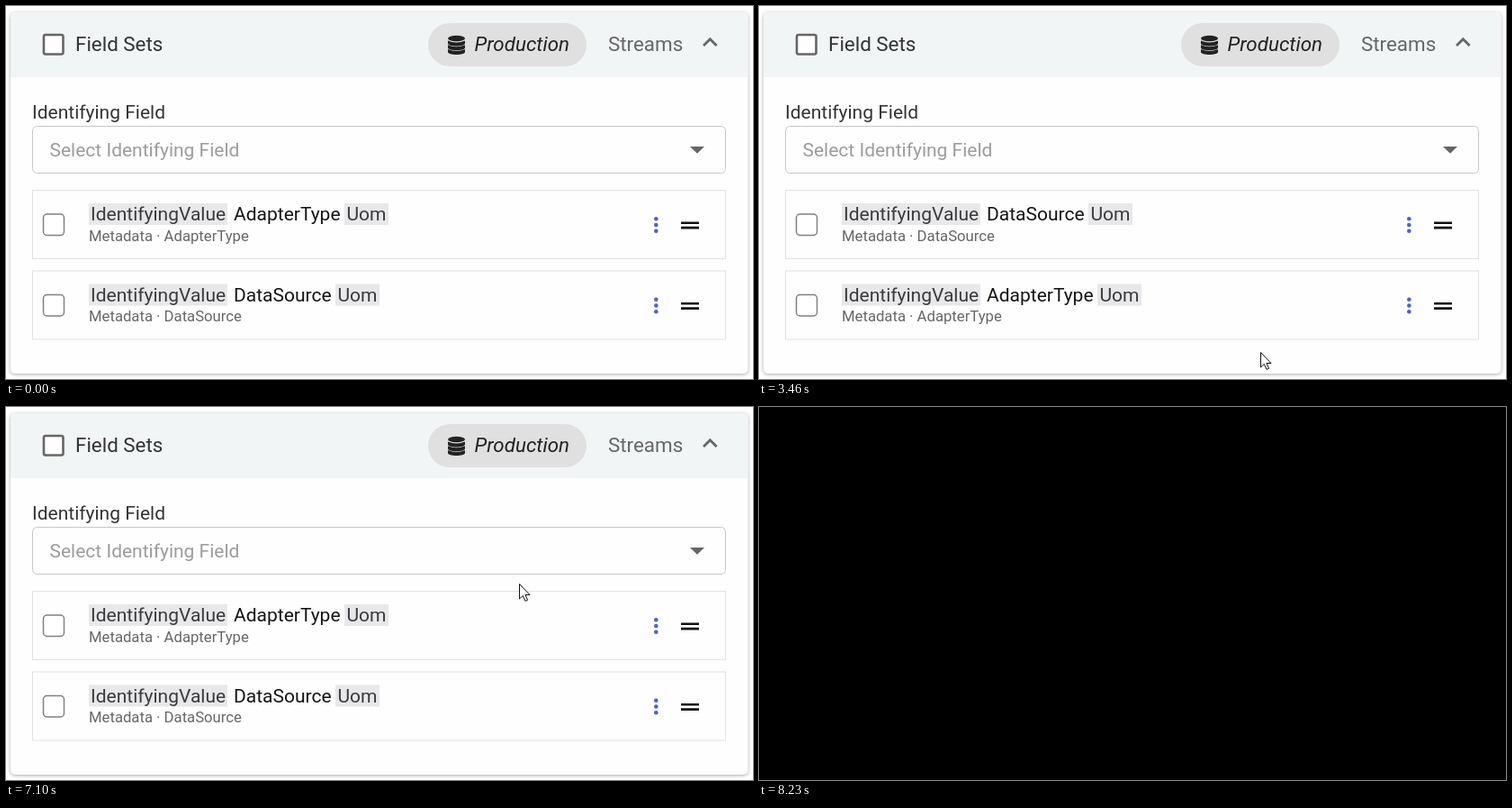
These frames come from a looping animation (830x414 px, 8730 ms). An HTML page:

```html
<!DOCTYPE html>
<html lang="en">
<head>
<meta charset="utf-8">
<title>Reordering field sets</title>
<style>
  html, body { margin: 0; width: 100%; height: 100%; overflow: hidden; background: #fff; }
  svg { display: block; width: 830px; height: 414px; font: 21px Roboto, Arial, sans-serif; }
  .card { fill: #fefefe; filter: drop-shadow(0 1.5px 2px #0005); }
  .big { font-size: 22.4px; }
  .meta { font-size: 16.7px; fill: #666; }
  .frame { fill: #fefefe; stroke: #e2e2e2; }
  .hot .frame { fill: #f1f1fc; stroke: #dcdcee; }
  .chip { fill: #e8e8ea; }
  .tag { fill: #3a3a3e; }
  .name { fill: #141414; }
  .hot .name { fill: #3a3a3e; }
  .check { fill: #fff; stroke: #808080; stroke-width: 1.5; }
</style>
</head>
<body>
<svg viewBox="0 0 830 414">
  <defs>
    <radialGradient id="glow" gradientUnits="userSpaceOnUse" cx="0" cy="0" r="1" gradientTransform="translate(0 -6) scale(500 37)">
      <stop offset="0" stop-color="#fff" stop-opacity=".88"/>
      <stop offset="1" stop-color="#fff" stop-opacity="0"/>
    </radialGradient>
    <mask id="fade" maskUnits="userSpaceOnUse" x="-600" y="-60" width="1200" height="120">
      <rect x="-600" y="-60" width="1200" height="120" fill="url(#glow)"/>
    </mask>
  </defs>

  <rect class="card" x="5" y="7" width="819.5" height="401" rx="5"/>
  <path d="M5 79V12q0-5 5-5H819.500q5 0 5 5V79z" fill="#f2f5f5"/>
  <rect x="42" y="32" width="21.500" height="21.500" rx="2" fill="#fff" stroke="#666" stroke-width="2.600"/>
  <text class="big" x="77" y="50" fill="#333">Field Sets</text>
  <rect x="469" y="19" width="176" height="48" rx="24" fill="#e0e0e1"/>
  <g fill="#222">
    <ellipse cx="500.500" cy="36" rx="9.500" ry="3.200"/>
    <path id="disc" d="M491 38.500q9.500 4 19 0v3c0 4-19 4-19 0z"/>
    <use href="#disc" y="4.700"/>
    <use href="#disc" y="9.400"/>
  </g>
  <text class="big" x="520.500" y="50" fill="#222" font-style="italic">Production</text>
  <text class="big" x="669" y="50" fill="#666">Streams</text>
  <path d="M775 44l7.300-7.300 7.300 7.300" fill="none" stroke="#666" stroke-width="2.800"/>

  <text x="29" y="125" fill="#333">Identifying Field</text>
  <rect x="29.500" y="133.500" width="770" height="52" rx="5" fill="#fefefe" stroke="#c6c6c6"/>
  <text x="48.500" y="167" fill="#9c9c9c">Select Identifying Field</text>
  <path d="M760 156h16l-8 7.800z" fill="#666"/>

  <g id="rows"></g>
  <rect id="line" x="29" y="196" width="771" height="4" fill="#4b5ce0"/>
  <g id="ghost" mask="url(#fade)"><use id="copy"/></g>
  <g id="cursor">
    <path d="M.5-.5V16l3.800-3.600 2.700 6 2.600-1.100-2.700-5.800H12z" fill="#fff" stroke="#111"/>
    <g id="badge" fill="none" stroke="#111">
      <rect x="3.500" y="14.500" width="10" height="7" stroke-dasharray="1.500 1.500"/>
      <rect x="10.500" y="18.500" width="10" height="10" fill="#fff"/>
      <path d="M12.500 23.500h6m-3-3v6"/>
    </g>
  </g>
  <rect id="dark" width="830" height="414"/>
</svg>
<script>
const $ = id => document.getElementById(id);
const LOOP = 8730, ROW_STEP = 89.5;

const row = (name, uomX) => `<g id="${name}">
  <rect class="frame" x="29.5" y="204.5" width="770" height="76"/>
  <rect class="check" x="41.5" y="231" width="23" height="23.5" rx="4"/>
  <rect class="chip" x="92" y="219" width="154" height="24"/>
  <rect class="chip" x="${uomX}" y="219" width="49" height="24"/>
  <text class="tag" x="94" y="238">IdentifyingValue</text>
  <text class="name" x="253" y="238">${name}</text>
  <text class="tag" x="${uomX + 2.5}" y="238">Uom</text>
  <text class="meta" x="92" y="260.500">Metadata · ${name}</text>
  ${[236.3, 243, 249.7].map(y => `<circle cx="722.300" cy="${y}" r="2.300" fill="#4f5ce0"/>`).join('')}
  <path d="M750 240.700h20m-20 5.400h20" stroke="#111" stroke-width="2.600"/>
</g>`;
$('rows').innerHTML = row('AdapterType', 376) + row('DataSource', 366);

// Cursor tip: [time, x, y]
const path = [
  [190, 519, 420], [430, 516, 332], [720, 516, 332], [1490, 523, 198],
  [2070, 523, 198], [2260, 568, 385], [2800, 568, 385], [2960, 559, 386],
  [3430, 559, 386], [3460, 557, 385], [3700, 557, 385], [3900, 567, 335],
  [4200, 567, 335], [4230, 573, 329], [4580, 573, 329], [5460, 563, 195],
  [7070, 563, 195], [7100, 570, 197], [7830, 570, 197], [8110, 598, 183]
];
const drags = [
  { name: 'DataSource', grab: 730, release: 1830, drop: 1900, from: [516, 332] },
  { name: 'AdapterType', grab: 4600, release: 6300, drop: 6360, from: [573, 329] }
];

function cursorAt(t) {
  const i = path.findIndex(p => p[0] > t);
  if (i === 0) return path[0].slice(1);
  if (i < 0) return path[path.length - 1].slice(1);
  const a = path[i - 1], b = path[i];
  const u = (t - a[0]) / (b[0] - a[0]), k = u * u * (3 - 2 * u);
  return [1, 2].map(n => a[n] + (b[n] - a[n]) * k);
}

const move = (id, x, y) => $(id).setAttribute('transform', `translate(${x} ${y})`);
const show = (id, on) => { $(id).style.display = on ? '' : 'none'; };

function draw(t) {
  const [x, y] = cursorAt(t);
  const swapped = t >= drags[0].drop && t < drags[1].drop;
  const drag = drags.find(d => t >= d.grab && t < d.drop);
  const held = drag && t < drag.release;

  move('AdapterType', 0, swapped ? ROW_STEP : 0);
  move('DataSource', 0, swapped ? 0 : ROW_STEP);
  for (const { name } of drags) $(name).classList.toggle('hot', drag?.name === name);

  show('ghost', held);
  if (held) {
    $('copy').setAttribute('href', '#' + drag.name);
    move('copy', -drag.from[0], -drag.from[1]);
    move('ghost', x, y);
  }
  show('line', drag && y < 282);
  show('badge', drag);
  move('cursor', x, y);
  $('dark').style.opacity = Math.min(1, Math.max(0, (t - 7730) / 500));
}

const start = performance.now();
function tick() {
  draw((performance.now() - start) % LOOP);
  requestAnimationFrame(tick);
}
tick();
</script>
</body>
</html>
```
